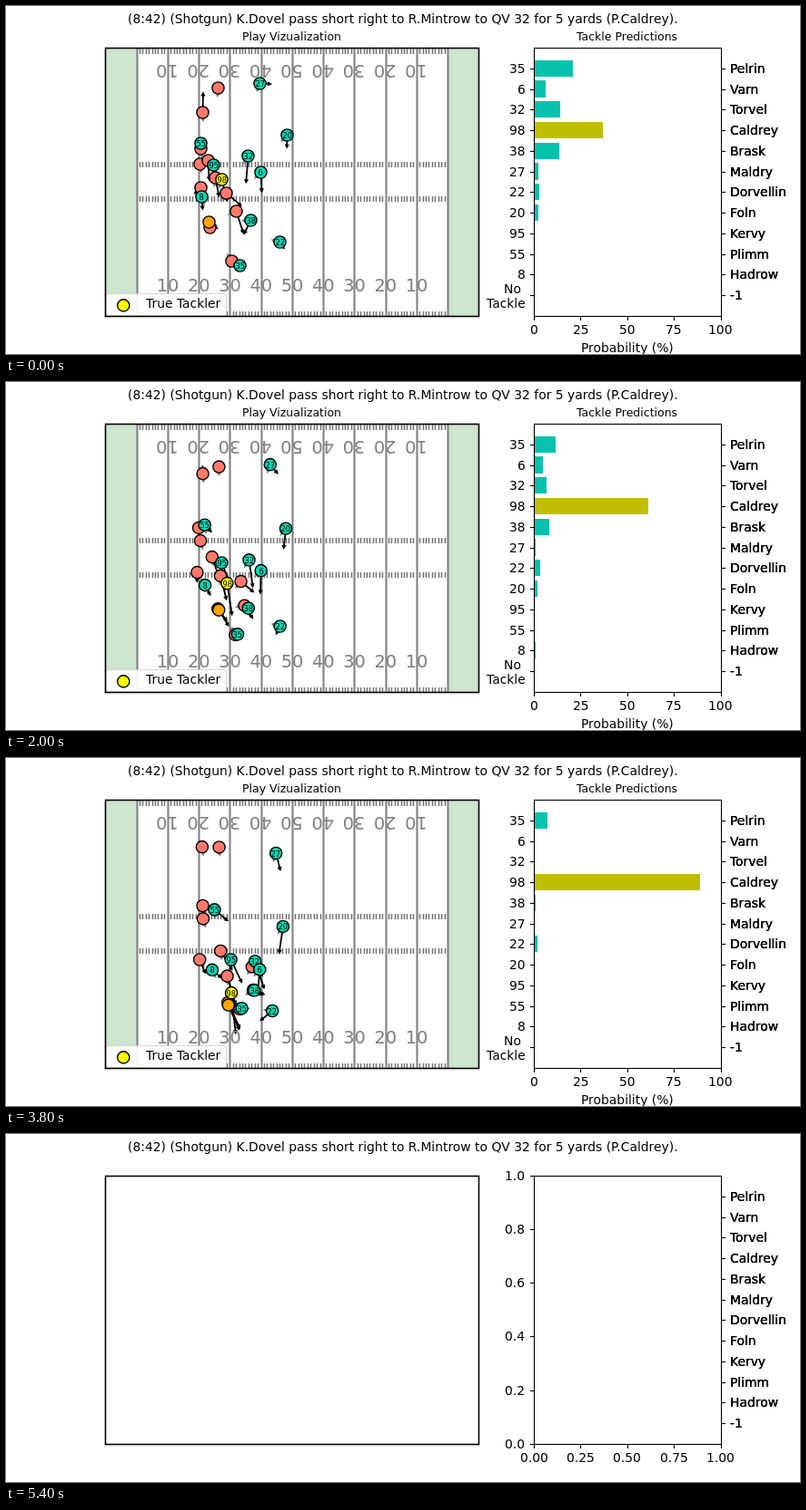
Write an HTML page with a canvas that moves like this. It is 874 by 384 pixels and loops after 5.6 s.

```html
<!DOCTYPE html>
<html lang="en">
<head>
<meta charset="utf-8">
<title>Play and tackle predictions</title>
<style>
html, body { margin: 0; width: 100%; height: 100%; overflow: hidden; background: #fff; }
canvas { display: block; }
</style>
</head>
<body>
<canvas id="stage" width="874" height="384"></canvas>
<script>
const ctx = document.getElementById('stage').getContext('2d');
const STEP = 200, FRAMES = 28, MIDDLE = 12, END = 22;
const SALMON = '#ff796c', AQUA = '#04d8b2', TEAL = '#06c2ac', YELLOW = '#ffff00', ORANGE = '#ffa500';
const GREY = '#808080', TACKLER = '98';
const TOP = 46.08, BOTTOM = 341.76, ROW = (BOTTOM - TOP) / 13;

// Paths: x, y at the start, MIDDLE and END, run with steady acceleration.
const ball = [223, 238, 236, 255, 248, 281];
const offense = [
  [233, 90, 234, 94, 234, 100],
  [216, 117, 216, 99, 215, 99],
  [214, 157, 212, 161, 219, 163],
  [213, 174, 214, 175, 218, 178],
  [222, 170, 228, 197, 240, 219],
  [230, 189, 237, 219, 246, 250],
  [214, 200, 210, 212, 215, 227],
  [242, 206, 261, 222, 274, 233],
  [253, 226, 264, 249, 275, 257],
  [248, 281, 253, 278, 259, 276],
  [224, 244, 235, 253, 248, 279]
];
// Odds: at the start, while closing in, and after contact.
const defense = [
  { num: '35', name: 'Pelrin', odds: [21, 16, 7.4], path: [257, 286, 255, 277, 262, 276] },
  { num: '6', name: 'Varn', odds: [6.5, 8.6, 0.6], path: [280, 183, 280, 213, 278, 242] },
  { num: '32', name: 'Torvel', odds: [14.3, 14, 0], path: [266, 165, 268, 202, 277, 233] },
  { num: TACKLER, name: 'Caldrey', odds: [36.7, 33.2, 89], path: [237, 191, 244, 229, 249, 273] },
  { num: '38', name: 'Brask', odds: [13.8, 15.5, 1], path: [269, 236, 267, 251, 277, 257] },
  { num: '27', name: 'Maldry', odds: [2.2, 1.5, 0], path: [279, 85, 292, 93, 298, 111] },
  { num: '22', name: 'Dorvellin', odds: [2.7, 4.6, 2], path: [301, 260, 300, 271, 288, 282] },
  { num: '20', name: 'Foln', odds: [2.2, 4, 0], path: [309, 142, 307, 166, 303, 195] },
  { num: '95', name: 'Kervy', odds: [0, 1.2, 0], path: [228, 175, 239, 204, 251, 230] },
  { num: '55', name: 'Plimm', odds: [0, 0, 0], path: [214, 151, 220, 159, 234, 171] },
  { num: '8', name: 'Hadrow', odds: [0, 1.4, 0], path: [215, 210, 220, 226, 230, 236] }
];
const names = [...defense.map(d => d.name), '-1'];

const rowY = i => TOP + ROW * (i + 1);
const yardX = yard => 109.25 + 3.425 * yard;
const chartX = part => 581.1 + 205.5 * part;
const snap = v => Math.round(v) + 0.5;

function ease(from, to, f) {
  const u = Math.min(1, Math.max(0, (f - from) / (to - from)));
  return u * u * (3 - 2 * u);
}

function chance([start, closing, contact], f) {
  const early = start + (closing - start) * ease(0, 4, f);
  return early + (contact - early) * ease(5, 15, f);
}

// Parabola through three values: [value, change per step].
function track(a, b, c, f) {
  const p = (b - a) / MIDDLE, q = ((c - b) / (END - MIDDLE) - p) / END;
  return [a + f * (p + q * (f - MIDDLE)), p + q * (2 * f - MIDDLE)];
}

function pose([x0, y0, x1, y1, x2, y2], f) {
  const [x, vx] = track(x0, x1, x2, f), [y, vy] = track(y0, y1, y2, f);
  return { x, y, vx, vy };
}

// Text starts on whole pixels; anchor 0 is left, 0.5 centre, 1 right.
function text(str, x, y, anchor = 0.5, size = 13.89, color = '#000') {
  ctx.font = `${size}px "DejaVu Sans", sans-serif`;
  ctx.fillStyle = color;
  ctx.fillText(str, Math.round(x - anchor * ctx.measureText(str).width), Math.round(y));
}

function line(x1, y1, x2, y2, color = '#000', width = 1.11) {
  ctx.strokeStyle = color;
  ctx.lineWidth = width;
  ctx.beginPath();
  ctx.moveTo(x1, y1);
  ctx.lineTo(x2, y2);
  ctx.stroke();
}

function rect(x, y, right, bottom, color) {
  ctx.fillStyle = color;
  ctx.fillRect(Math.round(x), Math.round(y), Math.round(right) - Math.round(x), Math.round(bottom) - Math.round(y));
}

function frameBox(x, w, width) {
  ctx.strokeStyle = '#000';
  ctx.lineWidth = width;
  ctx.strokeRect(x, 46.5, w, 296);
}

function dot(x, y, color) {
  ctx.beginPath();
  ctx.arc(x, y, 6.6, 0, 2 * Math.PI);
  ctx.fillStyle = color;
  ctx.fill();
  ctx.strokeStyle = '#000';
  ctx.lineWidth = 1.39;
  ctx.stroke();
}

function arrow(x, y, dx, dy, color) {
  const len = Math.hypot(dx, dy);
  if (len < 1) return;
  ctx.save();
  ctx.translate(x, y);
  ctx.rotate(Math.atan2(dy, dx));
  line(0, 0, len - 2, 0, color, 1.8);
  ctx.fillStyle = color;
  ctx.beginPath();
  ctx.moveTo(len, 0);
  ctx.lineTo(len - 5, -2.6);
  ctx.lineTo(len - 5, 2.6);
  ctx.fill();
  ctx.restore();
}

function drawField() {
  for (const yard of [0, 110]) rect(yardX(yard), TOP, yardX(yard + 10), BOTTOM, '#cce5cc');
  for (let yard = 10; yard <= 110; yard++) {
    const x = snap(yardX(yard));
    if (yard % 10 === 0) line(x, TOP, x, BOTTOM, GREY, 2.08);
    else for (const y of [47, 172, 210, 337]) line(x, y, x, y + 6, '#707070', 1.5);
  }
}

function drawYardNumbers() {
  for (let i = 1; i <= 9; i++) {
    const label = 10 * Math.min(i, 10 - i);
    ctx.save();
    ctx.translate(yardX(10 + 10 * i), 315);
    text(label, 0, 0, 0.5, 19.44, GREY);
    ctx.translate(0, -250);
    ctx.rotate(Math.PI);
    text(label, 0, 0, 0.5, 19.44, GREY);
    ctx.restore();
  }
}

function drawPlayers(f) {
  const target = pose(ball, f);
  const players = [
    ...offense.map(path => ({ ...pose(path, f), color: SALMON })),
    { ...target, color: ORANGE },
    ...defense.map(({ num, path }) =>
      ({ ...pose(path, f), num, color: num === TACKLER ? YELLOW : AQUA })).reverse()
  ];
  ctx.save();
  ctx.translate(0.5, 0.5);
  // Grey pointers face the ball, black ones show the next second of travel.
  for (const p of players) {
    const dx = target.x - p.x, dy = target.y - p.y, d = Math.hypot(dx, dy);
    if (d > 12) arrow(p.x, p.y, dx / d * 10.5, dy / d * 10.5, GREY);
  }
  for (const p of players) arrow(p.x, p.y, p.vx * 10, p.vy * 10, '#000');
  for (const p of players) dot(p.x, p.y, p.color);
  for (const p of players) if (p.num) text(p.num, p.x, p.y + 3, 0.5, 8.33);
  ctx.restore();
}

function drawLegend() {
  ctx.beginPath();
  ctx.roundRect(110, 317.5, 132.5, 24.5, 2.8);
  ctx.fillStyle = 'rgba(255,255,255,.93)';
  ctx.fill();
  ctx.strokeStyle = 'rgba(204,204,204,.8)';
  ctx.lineWidth = 1.2;
  ctx.stroke();
  dot(129.3, 330.4, YELLOW);
  text('True Tackler', 154, 333, 0);
}

function drawBars(f) {
  defense.forEach(({ num, odds }, i) => {
    const y = rowY(i), half = 0.4 * ROW;
    rect(chartX(0), y - half, chartX(chance(odds, f) / 100), y + half, num === TACKLER ? '#bfbf00' : TEAL);
    text(num, 571.4, y + 5, 1);
  });
  names.forEach((_, i) => line(577, snap(rowY(i)), 581.5, snap(rowY(i))));
  text('No ', 571.4, 317, 1);
  text('Tackle', 571.4, 333, 1);
  text('Probability (%)', 684, 382);
}

function drawEmptyScale() {
  for (let i = 0; i <= 5; i++) {
    const y = BOTTOM - (BOTTOM - TOP) * i / 5;
    line(577, snap(y), 581.5, snap(y));
    text((i / 5).toFixed(1), 571.4, y + 5, 1);
  }
}

function draw(f) {
  const empty = f === FRAMES - 1;
  rect(0, 0, 874, 384, '#fff');
  text('(8:42) (Shotgun) K.Dovel pass short right to R.Mintrow to QV 32 for 5 yards (P.Caldrey).', 437, 19);
  if (empty) drawEmptyScale();
  else {
    text('Play Vizualization', 314.5, 38, 0.5, 12.5);
    text('Tackle Predictions', 684, 38, 0.5, 12.5);
    drawField();
    drawPlayers(f);
    drawYardNumbers();
    drawLegend();
    drawBars(f);
  }
  frameBox(109.5, 411, 1.6);
  frameBox(581.5, 206, 1.11);
  for (let i = 0; i <= 4; i++) {
    const x = chartX(i / 4);
    line(snap(x), 342.5, snap(x), 347);
    text(empty ? (i / 4).toFixed(2) : 25 * i, x, 362);
  }
  names.forEach((name, i) => {
    line(787.5, snap(rowY(i)), 792, snap(rowY(i)));
    // Overprinted for a slightly heavier look.
    for (let n = 0; n < 3; n++) text(name, 796.7, rowY(i) + 5, 0);
  });
}

let start, shown = -1;
function tick(now) {
  start ??= now;
  const f = Math.floor((now - start) / STEP) % FRAMES;
  if (f !== shown) draw(shown = f);
  requestAnimationFrame(tick);
}
draw(0);
requestAnimationFrame(tick);
</script>
</body>
</html>
```
